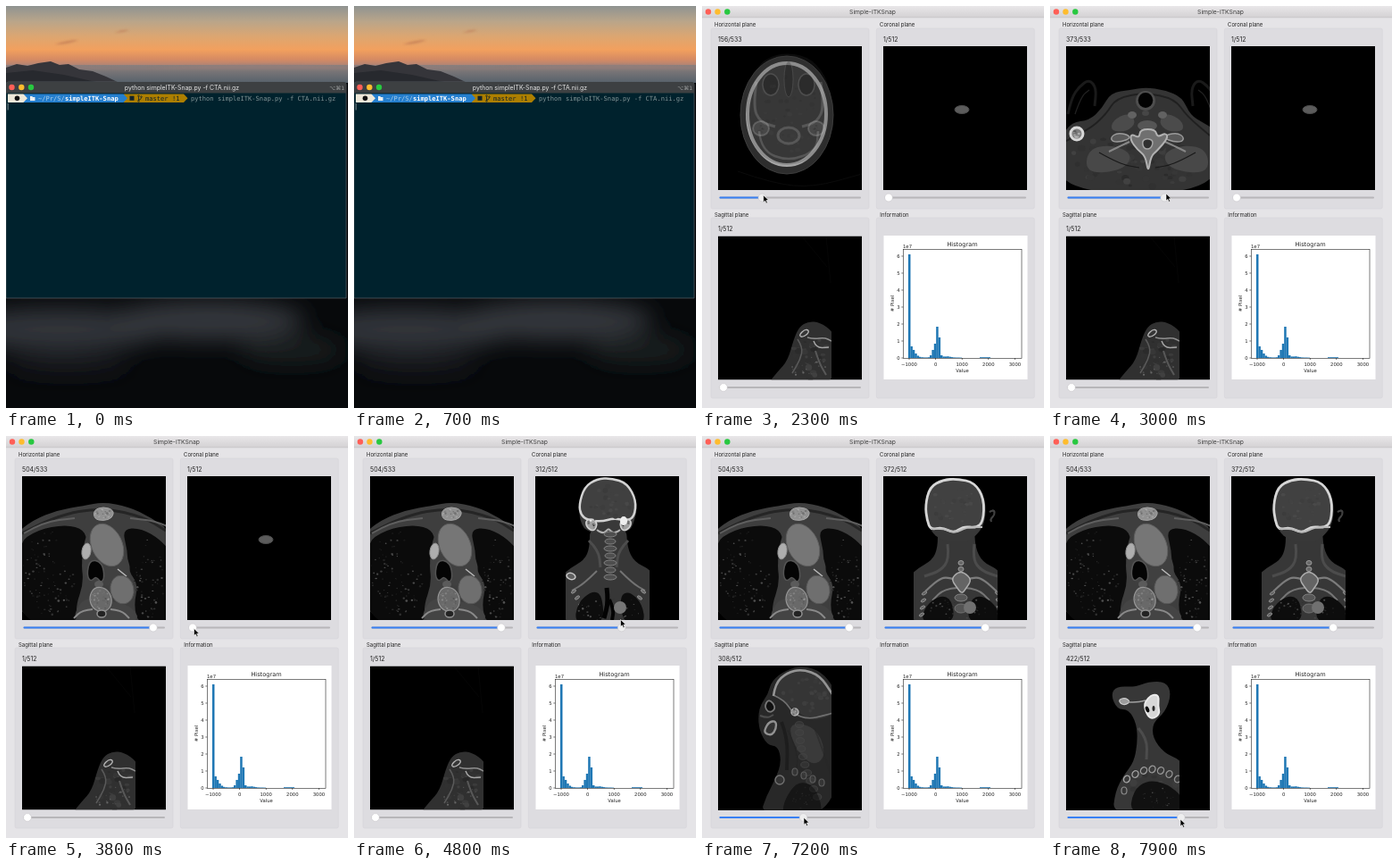
An HTML page with a canvas for the animation above (8000 ms loop, 383 px wide and 450 px high).

```html
<!DOCTYPE html>
<html lang="en">
<head>
<meta charset="utf-8">
<title>Simple-ITKSnap</title>
<style>
  html, body { margin: 0; width: 100%; height: 100%; overflow: hidden; background: #000; }
  svg, canvas { position: absolute; left: 0; top: 0; width: 383px; height: 450px; display: block; }
  text { font-family: Inter, "Open Sans", sans-serif; white-space: pre; }
  .plot text { font: 5.3px "DejaVu Sans", sans-serif; fill: #222; }
  .shell text { font: 7.1px "DejaVu Sans Mono", monospace; }
</style>
</head>
<body>
<svg id="app" viewBox="0 0 383 450"></svg>
<canvas id="scan" width="383" height="450"></canvas>
<svg id="front" viewBox="0 0 383 450">
  <defs>
    <linearGradient id="sky" x2="0" y2="1">
      <stop offset="0" stop-color="#8f9391"/><stop offset=".25" stop-color="#b9a58a"/>
      <stop offset=".5" stop-color="#dca671"/><stop offset=".72" stop-color="#f2a05e"/>
      <stop offset=".88" stop-color="#d58a63"/><stop offset="1" stop-color="#a7837a"/>
    </linearGradient>
    <linearGradient id="sea" x2="0" y2="1">
      <stop offset="0" stop-color="#8c7f7d"/><stop offset="1" stop-color="#56616b"/>
    </linearGradient>
    <filter id="soft" x="-30%" y="-60%" width="160%" height="220%"><feGaussianBlur stdDeviation="13"/></filter>
    <filter id="haze"><feGaussianBlur stdDeviation="1"/></filter>
    <clipPath id="night"><rect y="327" width="383" height="123"/></clipPath>
  </defs>
  <g id="desk">
    <rect width="383" height="450" fill="#07090b"/>
    <rect width="383" height="68" fill="url(#sky)"/>
    <rect y="66" width="383" height="20" fill="url(#sea)"/>
    <g filter="url(#haze)">
      <path d="M55 43q14-5 26-5q-10 5-26 5zM122 30q8-4 16-3q-8 3-16 3z" fill="#b8704f" opacity=".6"/>
      <path d="M0 67q40-2 90 1t130-1t163 1v3H0z" fill="#977f7b" opacity=".6"/>
    </g>
    <path d="M0 69L12 65 24 67 36 64 50 62 60 66 70 65 82 71 97 73 112 79 127 86H0z" fill="#35353a"/>
    <path d="M0 75L30 72 65 77 105 86H0z" fill="#27292e"/>
    <g clip-path="url(#night)"><g filter="url(#soft)">
      <ellipse cx="60" cy="362" rx="120" ry="24" fill="#30363a"/>
      <ellipse cx="225" cy="352" rx="110" ry="22" fill="#34393c"/>
      <ellipse cx="320" cy="385" rx="60" ry="14" fill="#1c2124"/>
      <ellipse cx="70" cy="402" rx="70" ry="9" fill="#1b1f22"/>
    </g></g>
    <g class="shell">
      <path d="M0 327V88q0-3 3-3H378q3 0 3 3V327z" fill="#00222d" stroke="#5c6467" stroke-width=".7"/>
      <path d="M0 97.500V88q0-3 3-3H378q3 0 3 3V97.500z" fill="#3d4042"/>
      <circle cx="6.500" cy="91" r="3.200" fill="#ff5f57"/>
      <circle cx="17.300" cy="91" r="3.200" fill="#febc2e"/>
      <circle cx="28" cy="91" r="3.200" fill="#28c840"/>
      <text x="197" y="93.700" text-anchor="middle" fill="#e5e5e5" style="font:6.9px Inter,sans-serif">python simpleITK-Snap.py -f CTA.nii.gz</text>
      <text x="379" y="93.500" text-anchor="end" fill="#a0a3a4" style="font:6px 'DejaVu Sans',sans-serif">⌥⌘1</text>
      <path d="M132 98.500H199l4.500 4.700-4.500 4.700H132z" fill="#ad7f00"/>
      <path d="M20 98.500H131.500l4.500 4.700-4.500 4.700H20z" fill="#257fce"/>
      <path d="M2 98.500H19.500l4.500 4.700-4.500 4.700H2z" fill="#eee8d9"/>
      <circle cx="12.500" cy="103.200" r="2.800" fill="#111"/>
      <path d="M27 101h2.300l.7 1h2.500v4H27z" fill="#e8eef2"/>
      <text x="36" y="105.800" fill="#a9cdea">~/Pr/S/<tspan fill="#fff" font-weight="bold">simpleITK-Snap</tspan></text>
      <rect x="138.500" y="100.700" width="5" height="5" fill="#15242a"/>
      <g fill="none" stroke="#15242a" stroke-width=".8">
        <path d="M148.500 101.500v4M148.500 105q3 0 3-2.500"/>
        <circle cx="148.500" cy="100.700" r=".8"/><circle cx="148.500" cy="106.300" r=".8"/><circle cx="151.500" cy="101.700" r=".8"/>
      </g>
      <text x="156" y="105.800" fill="#15242a">master !1</text>
      <text x="207" y="105.800" fill="#839496">python simpleITK-Snap.py -f CTA.nii.gz</text>
      <path d="M2.200 109v7.500" stroke="#9aa5a6" stroke-width=".8"/>
    </g>
  </g>
  <path id="arrow" d="M0 0V8L1.900 6.300 3.200 9.200 4.600 8.600 3.300 5.800 5.800 5.600z" fill="#000" stroke="#fff" stroke-width=".6"/>
</svg>

<script>
const LOOP = 8000, STEP = 100, OPEN = 1000, FOCUS = 1500;

// Slice number over time, with each panel's place and slice count
const planes = [
  { name: 'Horizontal plane', x: 18, y: 45, max: 533, keys: [[1800, 1], [3000, 373], [3500, 504]] },
  { name: 'Coronal plane', x: 203, y: 45, max: 512, keys: [[3900, 1], [4800, 312], [5300, 372]] },
  { name: 'Sagittal plane', x: 18, y: 257.5, max: 512, keys: [[5900, 1], [6500, 194], [7900, 422]] }
];
const pointer = [[1400, 100, 130], [1800, 25, 213], [3000, 130, 210], [3500, 167, 212], [3800, 210.5, 215.5],
  [3900, 210.5, 215], [4800, 298.5, 205.5], [5300, 318, 212], [5500, 318, 213], [5800, 26, 435],
  [5900, 25, 426], [6500, 82, 425.5], [7900, 146, 429]];

function at(keys, t) {
  if (t <= keys[0][0]) return keys[0].slice(1);
  for (let i = 1; i < keys.length; i++) {
    const [a, ...p] = keys[i - 1], [b, ...q] = keys[i];
    if (t <= b) return p.map((v, k) => v + (q[k] - v) * (t - a) / (b - a));
  }
  return keys[keys.length - 1].slice(1);
}

// ---- window ----
const $ = id => document.getElementById(id);
const rect = (x, y, w, h, fill, more = '') => `<rect x="${x}" y="${y}" width="${w}" height="${h}" fill="${fill}" ${more}/>`;
const text = (x, y, size, s, more = '') => `<text x="${x}" y="${y}" font-size="${size}" ${more}>${s}</text>`;

function plot() {
  const bars = [116, 13, 9, 5, 2.5, 1.2, .8, .6, .6, .8, 3, 9, 16, 35, 23, 3, 1.6, 1.6, 1.8, 1.3, .9, .6, .5, .5, .4];
  let s = rect(203.5, 257, 161, 161, '#fff') + '<g class="plot">';
  bars.forEach((h, i) => s += rect(231 + i * 2.4, 394 - h, 2.5, h, '#1f77b4'));
  s += rect(311, 393.2, 12, .8, '#1f77b4') + rect(225.3, 272.3, 132.7, 122, 'none', 'stroke="#222" stroke-width=".6"');
  for (let i = 0; i < 5; i++) {
    const x = 232 + i * 29.6;
    s += rect(x - .3, 394, .6, 2, '#222') + text(x, 402.7, 5.3, i ? (i - 1) * 1000 : '−1000', 'text-anchor="middle"');
  }
  for (let i = 0; i < 7; i++) {
    const y = 394 - i * 19;
    s += rect(223.3, y - .3, 2, .6, '#222') + text(221.5, y + 2, 5.3, i, 'text-anchor="end"');
  }
  return s + text(225, 270.5, 5.3, '1e7')
    + text(291.5, 269, 6.6, 'Histogram', 'text-anchor="middle" style="font-size:6.6px"')
    + text(291.5, 410, 5.3, 'Value', 'text-anchor="middle"')
    + text(0, 0, 5.3, '# Pixel', 'text-anchor="middle" transform="translate(214.500 333) rotate(-90)"') + '</g>';
}

function windowMarkup() {
  let s = `<defs><linearGradient id="bar" x2="0" y2="1"><stop stop-color="#e9e7e9"/><stop offset="1" stop-color="#d3d1d3"/></linearGradient></defs>`;
  s += rect(0, 0, 383, 450, '#e5e4e7') + '<rect id="title" width="383" height="13" fill="#f4f4f4"/>' + rect(0, 12.7, 383, .5, '#bdbbbe');
  [7, 17.5, 28.3].forEach((x, i) => s += `<circle id="light${i}" cx="${x}" cy="6.5" r="3.2"/>`);
  s += text(191, 9, 6.8, 'Simple-ITKSnap', 'id="name" text-anchor="middle"');
  for (const x of [10, 195.3]) for (const y of [25, 237])
    s += rect(x, y, 177, 202, '#dddce0', 'rx="2" stroke="#d5d4d8" stroke-width=".6"');
  planes.forEach((p, i) => {
    const y = p.y + 169.5;
    s += text(p.x - 4, p.y - 22, 6, p.name, 'fill="#222"') + text(p.x, p.y - 5.2, 7, '', `id="count${i}" fill="#222"`)
      + rect(p.x + 1.5, y - .9, 158.5, 1.8, '#b7b6b9', 'rx=".9"')
      + rect(p.x + 1.5, y - .9, 0, 1.8, '#3880f4', `id="fill${i}" rx=".9"`)
      + `<circle id="knob${i}" cy="${y}" r="4.4" stroke="#c2c1c4" stroke-width=".5"/>`;
  });
  return s + text(199.3, 235.5, 6, 'Information', 'fill="#222"') + plot();
}
$('app').innerHTML = windowMarkup();

// ---- scans ----
const c = $('scan').getContext('2d');
const gray = v => `rgb(${v},${v},${v})`;
const points = s => s.split(' ').map(p => p.split(',').map(Number));

function paint(fill, line, width) {
  if (fill != null) { c.fillStyle = gray(fill); c.fill(); }
  if (line != null) { c.strokeStyle = gray(line); c.lineWidth = width; c.stroke(); }
}
function blob(s, fill, line, width = 1) {
  const p = points(s), mid = (a, b) => [(a[0] + b[0]) / 2, (a[1] + b[1]) / 2];
  c.beginPath();
  c.moveTo(...mid(p[p.length - 1], p[0]));
  p.forEach((a, i) => c.quadraticCurveTo(...a, ...mid(a, p[(i + 1) % p.length])));
  c.closePath();
  paint(fill, line, width);
}
function line(s, v, width = 1) {
  const p = points(s);
  c.beginPath();
  c.moveTo(...p[0]);
  for (let i = 1; i < p.length - 1; i++)
    c.quadraticCurveTo(...p[i], (p[i][0] + p[i + 1][0]) / 2, (p[i][1] + p[i + 1][1]) / 2);
  c.lineTo(...p[p.length - 1]);
  paint(null, v, width);
}
function oval(x, y, rx, ry, fill, ring, width = 1, turn = 0) {
  c.beginPath();
  c.ellipse(x, y, rx, ry, turn, 0, 7);
  paint(fill, ring, width);
}
function specks(seed, count, x, y, rx, ry, low, high, size = 1) {
  const rnd = () => (seed = (seed * 16807) % 2147483647) / 2147483647;
  for (let i = 0; i < count; i++) {
    const a = rnd() * 6.283, r = Math.sqrt(rnd()), s = size * (.4 + rnd() * .6);
    oval(x + Math.cos(a) * r * rx, y + Math.sin(a) * r * ry, s, s * (.5 + rnd() * .5), low + rnd() * (high - low) | 0);
  }
}
function mirror(x, draw) {
  draw();
  c.save(); c.translate(2 * x, 0); c.scale(-1, 1); draw(); c.restore();
}

// Axial slices
function crown(n) {
  const k = Math.min(1, Math.sqrt(n / 140)), grow = (a, b) => a + (b - a) * k;
  oval(95, grow(144, 122), grow(25, 52), grow(31, 66), 58, 78, 1);
  const rx = grow(10, 44), ry = grow(11, 57), y = grow(142, 121);
  oval(95, y, rx, ry, n < 12 ? 205 : 72, 215, grow(2, 4));
  if (n < 12) specks(5, 26, 95, 143, 9, 10, 170, 235, 2);
  else specks(9, 60, 95, y, rx * .8, ry * .8, 62, 82, 3);
  line('40,185 80,199 125,203 179,188', 18, .8);
}
function face() {
  blob('50,85 70,58 97,52 124,59 143,86 145,125 133,165 96,182 60,166 48,125', 56);
  mirror(97, () => {
    oval(77, 88, 9, 12, 6, 175, 1.5);
    line('61,85 57,112 65,130 82,135', 190, 3);
    oval(66, 137, 9, 8, 130, 205, 2);
    specks(8, 8, 66, 137, 6, 5, 10, 60, 2);
  });
  oval(97, 82, 5, 20, 12, 150, 1);
  oval(97, 145, 12, 9, 72, 195, 3);
  line('64,140 66,162 97,174 128,162 130,140', 190, 2.5);
}
function throat() {
  blob('62,108 74,78 100,70 128,77 143,106 145,145 132,172 100,180 70,172 57,145', 58);
  line('72,124 78,92 101,81 124,92 130,124', 195, 4);
  oval(101, 116, 8, 6, 3);
  oval(101, 140, 12, 9, 110, 180, 2);
  oval(101, 150, 6, 4, 50, 175, 2);
  line('101,153 101,168', 180, 3);
  mirror(101, () => { oval(80, 130, 5, 5, 105); blob('68,140 85,145 90,168 72,165', 76); });
}
function inlet() {
  mirror(105, () => {
    line('20,121 24,103 33,90 44,82 52,92 50,112', 26, 3);
    line('28,121 35,101 44,94', 34, 1.2);
  });
  blob('10,210 10,150 24,130 44,128 58,115 68,97 90,94 107,91 128,94 148,102 157,122 172,131 188,140 188,210', 52);
  line('18,151 43,139 63,121 74,103 107,97 140,104 153,123 179,145', 32, 2);
  specks(3, 80, 100, 174, 78, 30, 42, 66, 5);
  mirror(109, () => {
    blob('70,128 88,119 97,130 86,141 68,140', 75);
    blob('42,160 70,155 93,166 82,184 40,188', 72);
    oval(92, 122, 5, 4, 98);
    blob('68,147 75,142 87,144 90,148 80,152 70,152', 90, 155, 1.5);
    line('66,163 76,158 89,152', 135, 2);
    line('55,164 78,177 100,181', 25, 1.2);
  });
  oval(107, 106, 11, 11, 78);
  oval(107, 105.500, 8.200, 8.500, 2);
  oval(107, 120, 4, 3, 70);
  oval(109, 134, 11, 6, 85);
  blob('91,143 100,148 101,138 118,138 120,147 130,142 132,148 120,162 113,168 110,187 107,168 98,161 90,150', 112, 178, 2);
  blob('103,151 109,148 116,151 113,160 105,160', 48, 165, 1.5);
  oval(30, 143, 7, 7, 125, 215, 3);
  specks(71, 8, 30, 143, 4, 4, 80, 190, 2);
}
function chest() {
  blob('8,220 8,112 30,94 58,83 87,78 109,74 137,79 162,91 188,109 188,220', 62);
  line('18,109 55,89 109,80 155,91 179,106', 37, 3);
  blob('12,210 12,121 35,105 67,99 88,105 91,121 84,140 87,165 78,190 80,212', 11);
  blob('130,104 151,103 173,116 188,134 188,210 149,212 143,190 148,166 137,151 136,128', 11);
  specks(29, 95, 48, 155, 30, 49, 20, 88, 1.4);
  specks(58, 60, 161, 159, 17, 45, 20, 88, 1.4);
  mirror(108, () => line('20,109 42,96 77,92', 95, 2));
  blob('98,83 109,79 121,83 119,92 109,95 99,93', 145, 165, 1);
  specks(17, 23, 109, 87, 9, 5, 110, 205, 1.5);
  blob('88,112 99,102 119,105 137,137 140,155 123,169 93,165 84,148', 64);
  oval(113, 122, 17, 25, 118, 96, 1, -.45);
  oval(90, 129, 5, 9, 174, 145, 1, .15);
  blob('92,145 96,139 104,140 109,147 110,160 106,164 101,157 95,163 91,157', 4, 84, 1.5);
  oval(104, 166, 5, 4, 91);
  line('125,149 135,157', 188, 1.5);
  blob('74,210 82,186 96,181 119,185 142,191 151,210', 68);
  blob('93,180 99,169 112,170 119,181 117,193 107,198 96,192', 105, 150, 1.2);
  specks(81, 40, 106, 183, 11, 11, 75, 145, 1.4);
  oval(107, 199, 5, 4, 35, 145, 1.5);
  mirror(107, () => line('97,194 85,195 76,204', 138, 2));
  oval(130, 172, 13, 16, 111, 88, 1, -.2);
}

// Coronal slices
function tip(n) {
  const k = Math.max(0, (n - 1) / 80);
  oval(291 - 5 * k, 116 - 9 * k, 8 + 15 * k, 4.5 + 18 * k, 92 - 22 * k, 75, 1);
}
function torso(top) {
  blob(`264,${top} 305,${top} 306,125 314,141 331,149 340,162 340,215 228,215 228,162 240,149 258,139 264,125`, 55);
}
function jaws() {
  torso(143);
  blob('253,88 263,62 284,55 307,65 315,91 309,122 298,142 275,142 260,125', 53);
  line('259,85 268,62 285,58 303,65 310,86', 190, 2.5);
  mirror(285, () => { oval(272, 86, 9, 8, 35, 180, 1.5); oval(272, 103, 7, 9, 4, 150, 1); line('263,112 268,132 282,136', 175, 3); });
  line('275,119 294,119', 225, 4);
  mirror(285, () => line('240,170 261,164 282,169', 165, 4));
}
function skullFront() {
  torso(100);
  blob('252,78 257,58 272,48 288,46 308,53 318,75 314,96 307,109 262,109 253,96', 57);
  blob('252,77 258,57 272,48 288,47 306,53 316,72 314,90 306,95 291,92 277,96 261,94 254,88', 64, 210, 2.5);
  specks(44, 28, 286, 73, 24, 20, 58, 73, 3);
  mirror(285, () => {
    blob('259,95 267,92 273,98 269,107 261,103', 160, 210, 1.5);
    specks(23, 9, 267, 99, 6, 6, 8, 240, 2);
    line('272,105 278,110 285,104', 178, 2);
    line('263,117 274,128 276,147', 77, 3);
    line('272,151 258,165 244,173', 115, 2);
    for (let i = 0; i < 4; i++) oval(246 + i * 4, 174 + i * 7, 3, 1.5, 105, 145, 1, -.6);
  });
  oval(302, 95, 4, 5, 238);
  for (let i = 0; i < 7; i++) oval(287, 110 + i * 8, 7 - i % 2, 3, 78, 130, 1);
  blob('247,211 250,187 267,173 278,178 280,211', 13);
  blob('302,211 297,180 308,173 323,188 326,211', 13);
  specks(61, 36, 286, 193, 37, 14, 32, 89, 1.2);
  line('283,170 285,185 280,204', 3, 5);
  line('286,183 291,194 289,206', 4, 4);
  oval(298, 192, 7, 7, 118);
  oval(243, 157, 5, 3.5, 95, 200, 1.5, .3);
}
function skullBack() {
  torso(101);
  blob('249,80 253,58 268,48 285,46 306,51 318,72 317,98 306,113 294,119 268,117 255,106', 56);
  blob('250,78 255,57 270,49 286,48 305,52 316,70 315,96 307,103 293,101 282,109 269,102 256,105 252,94', 65, 214, 2.8);
  specks(32, 28, 283, 75, 25, 22, 60, 74, 3);
  line('256,104 270,103 283,109 296,102 314,102', 185, 2);
  line('322,85 327,82 328,88 323,93 324,96', 64, 1.8);
  mirror(290, () => {
    line('275,121 277,138 267,151 249,157', 76, 3);
    line('286,162 274,157 263,162 250,174', 124, 2.3);
    line('286,170 271,171 258,184', 118, 1.8);
    blob('245,210 250,190 267,178 280,183 283,210', 13);
    for (let i = 0; i < 4; i++) oval(249 - i, 176 + i * 8, 3, 1.5, 100, 145, 1, -.5);
  });
  specks(66, 40, 288, 193, 35, 12, 25, 80, 1.2);
  for (let i = 0; i < 4; i++) oval(290, 142 + i * 7, 3, 2.5, 105, 155, 1);
  blob('279,160 287,152 294,153 302,161 296,170 291,177 285,169', 100, 172, 1.5);
  oval(290, 181, 7, 4, 86, 130, 1);
  oval(290, 193, 7, 5, 84, 115, 1);
  oval(300, 192, 7, 7, 112);
}

// Sagittal slices
function shoulder() {
  blob('72,425 85,409 96,397 103,372 109,359 119,353 132,354 146,364 152,378 152,425', 48);
  specks(47, 36, 122, 394, 22, 24, 40, 65, 4);
  blob('109,368 115,362 120,363 118,368 111,371', 55, 185, 1.3);
  line('118,371 125,373 137,371 145,375', 142, 1.5);
  line('125,375 128,383 142,382', 165, 1.5);
  line('107,373 113,382 110,396 101,411', 90, 1.5);
  line('127,386 131,399 139,413', 88, 2);
  specks(18, 20, 118, 403, 21, 13, 66, 110, 1.2);
  line('112,258 140,292', 9, .7);
  line('139,258 144,310', 9, .7);
}
function sideHead() {
  blob('70,425 73,398 83,379 94,365 98,343 97,322 88,306 75,306 68,289 75,280 96,281 110,275 130,275 136,289 129,309 115,321 115,338 128,355 145,362 153,374 153,425', 55);
  specks(37, 38, 112, 390, 31, 26, 44, 66, 4);
  blob('77,295 84,293 90,297 85,301 79,300', 156, 205, 1.2);
  line('88,298 98,298 107,296', 160, 1.5);
  blob('105,301 110,293 116,289 122,291 121,302 123,311 115,317 109,313', 215, 235, 2);
  oval(109, 306, 2, 3.500, 10, null, 1, -.4);
  oval(116, 305, 1.500, 3, 42);
  line('99,327 109,339 108,362', 76, 3);
  for (let i = 0; i < 7; i++)
    oval(86 + i * 9.5, 384 - 11 * Math.sin(i / 6 * Math.PI), 3.4, 4, 58, 165 - i * 4, 1.3, .5);
  oval(83, 397, 3, 4, 54, 140, 1.2);
  blob('89,425 93,397 109,385 131,389 150,405 151,425', 17);
  specks(63, 22, 121, 405, 19, 11, 30, 80, 1);
}
function head() {
  blob('65,425 72,403 83,383 89,364 85,347 73,346 64,329 63,312 66,300 74,289 78,274 94,262 113,257 134,264 148,282 153,300 153,425', 55);
  blob('79,287 84,272 99,263 115,261 134,268 150,289 150,309 137,316 121,318 110,311 94,299', 64);
  specks(13, 34, 116, 289, 25, 22, 58, 73, 3);
  line('80,291 82,277 95,265 112,261 132,268 146,289', 214, 2.5);
  line('80,290 93,296 102,311 119,317 136,313 147,310', 155, 1.5);
  blob('70,303 74,295 80,299 82,306 75,310', 4, 177, 1.7);
  line('65,313 73,316 80,312', 98, 2);
  blob('70,329 75,320 83,319 83,328 78,335 71,333', 60, 210, 2.3);
  oval(104, 309, 4, 4, 170, 230, 1.5);
  specks(52, 9, 104, 309, 4, 4, 5, 230, 1.4);
  blob('97,324 112,321 131,331 139,359 123,370 103,347', 70);
  line('96,329 107,352 106,376', 37, 1.2);
  line('126,327 137,356 144,379', 42, 2);
  oval(87, 385, 5, 5, 62, 158, 1.3);
  for (let i = 0; i < 4; i++) oval(104 + i * 10, 376 + i * 4, 3, 4, 63, 120, 1.2);
  blob('90,425 92,408 106,387 124,390 133,409 134,425', 14);
  specks(34, 24, 112, 405, 14, 12, 27, 83, 1.2);
}
function midline() {
  head();
  for (let i = 0; i < 10; i++) oval(109 + i * i * .25, 323 + i * 9, 4.5, 3.3, 102, 165, 1);
  line('89,320 96,338 95,374', 3, 4);
}

const poses = [
  [[1, crown], [140, crown], [210, face], [285, throat], [373, inlet], [450, inlet], [504, chest]],
  [[1, tip], [80, tip], [180, jaws], [312, skullFront], [372, skullBack]],
  [[1, shoulder], [90, sideHead], [194, head], [270, midline], [340, head], [422, sideHead]]
];

function drawScan(i, n) {
  const { x, y } = planes[i], list = poses[i];
  c.save();
  c.beginPath(); c.rect(x, y, 161, 161); c.clip();
  c.fillStyle = '#000'; c.fillRect(x, y, 161, 161);
  const left = i === 1 ? 237 : x, right = i === 1 ? 331 : i === 2 ? 145 : 179;
  c.beginPath(); c.rect(left, y, right - left, 161); c.clip();
  let k = 0;
  while (k < list.length - 2 && n >= list[k + 1][0]) k++;
  const [a, from] = list[k], [b, to] = list[k + 1], mix = (n - a) / (b - a);
  if (mix < 1) from(n);
  if (from !== to && mix > 0) {
    // Fade through a separate pass so overlapping parts stay solid
    if (mix < 1) {
      c.globalAlpha = mix;
      c.fillStyle = '#000'; c.fillRect(x, y, 161, 161);
    }
    to(n);
  }
  c.restore();
  if (i === 1 && n > 330) line('322,85 327,82 328,88 323,93 324,96', 64, 1.8);
}

// ---- playback ----
const shown = [];
function render(t) {
  const open = t >= OPEN, active = t >= FOCUS;
  $('desk').style.display = open ? 'none' : '';
  $('arrow').style.display = t >= pointer[0][0] ? '' : 'none';
  $('arrow').setAttribute('transform', `translate(${at(pointer, t)})`);
  $('title').setAttribute('fill', active ? 'url(#bar)' : '#f2f1f3');
  $('name').setAttribute('fill', active ? '#3c3c3c' : '#a5a4a6');
  ['#ff5f57', '#febc2e', '#28c840'].forEach((v, i) => $('light' + i).setAttribute('fill', active ? v : '#d2d1d3'));
  planes.forEach((p, i) => {
    const n = Math.round(at(p.keys, t)[0]), x = p.x + 6 + 149 * (n - 1) / (p.max - 1);
    const held = t >= p.keys[0][0] && t <= p.keys[p.keys.length - 1][0];
    $('count' + i).textContent = `${n}/${p.max}`;
    $('fill' + i).setAttribute('width', n > 1 ? x - p.x - 1.5 : 0);
    $('knob' + i).setAttribute('cx', x);
    $('knob' + i).setAttribute('fill', held ? '#eeeeef' : '#fff');
    if (shown[i] !== n) { drawScan(i, n); shown[i] = n; }
  });
}

const start = performance.now();
function tick(now) {
  const t = Math.max(0, now - start) % LOOP;
  render(Math.floor(t / STEP) * STEP);
  requestAnimationFrame(tick);
}
render(0);
requestAnimationFrame(tick);
</script>
</body>
</html>
```
